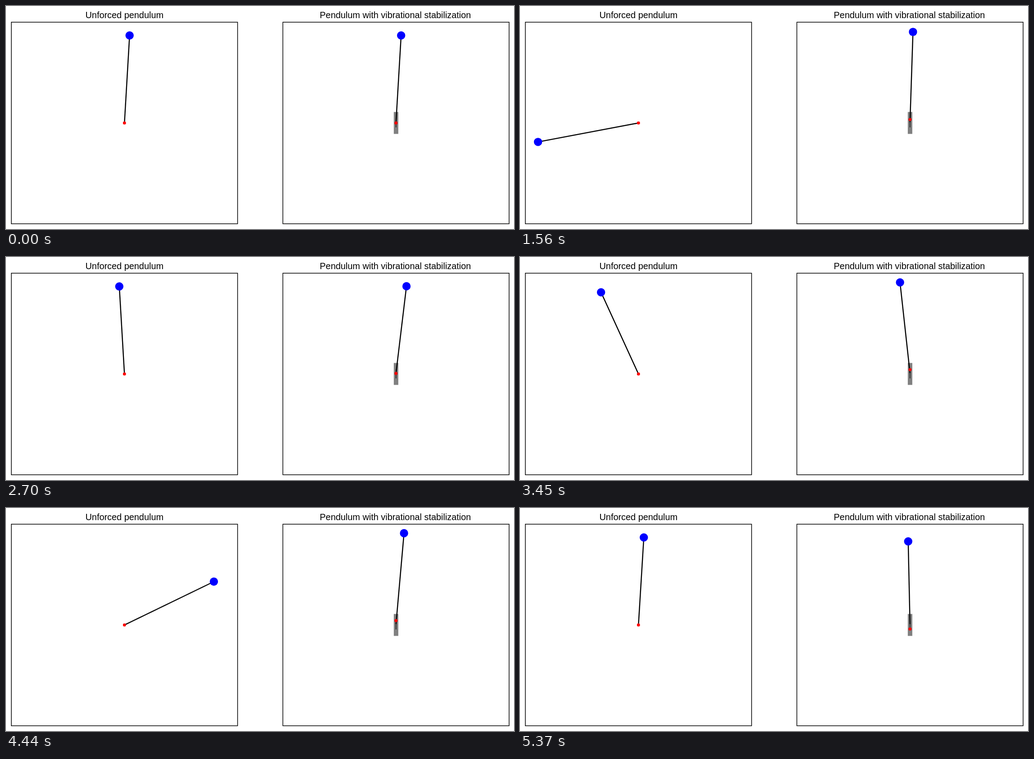
These frames come from a looping animation (1129 px wide and 496 px high, 5400 ms). An HTML page:

```html
<!DOCTYPE html>
<html lang="en">
<head>
<meta charset="utf-8">
<title>Pendulum stabilization</title>
<style>
  html, body { margin: 0; width: 100%; height: 100%; overflow: hidden; background: #fff; }
  svg { display: block; }
  text { font: 19.9px "Liberation Sans", Arial, sans-serif; text-anchor: middle; }
  .frame { fill: none; stroke: #000; stroke-width: 1.5; }
  .rod { stroke: #000; stroke-width: 2.4; }
  .bob { fill: #00f; }
  .pivot { fill: #f00; }
</style>
</head>
<body>
<svg width="1129" height="496" viewBox="0 0 1129 496">
  <g id="free" transform="translate(263.25 260.2)">
    <text y="-233.2">Unforced pendulum</text>
    <rect class="frame" x="-251.4" y="-224.2" width="502.8" height="448.4"/>
    <line class="rod"/>
    <circle class="bob" r="9.2"/>
    <circle class="pivot" r="3.4"/>
  </g>
  <g id="driven" transform="translate(866.75 260.2)">
    <text x="-1.4" y="-233.2">Pendulum with vibrational stabilization</text>
    <rect class="frame" x="-251.4" y="-224.2" width="502.8" height="448.4"/>
    <rect x="-4.9" y="-24.5" width="10" height="48.8" fill="#808080"/>
    <line y1="-9.8" y2="9.8" stroke="#000" stroke-width="1.2"/>
    <line class="rod" y1="-2"/>
    <circle class="bob" r="9.2"/>
    <circle class="pivot" r="3.4"/>
  </g>
</svg>
<script>
const FRAME_MS = 30, FRAMES = 180;
const LENGTH_X = 228.6, LENGTH_Y = 195;   // the axes scale x and y differently
const START_ANGLE = 0.05;                 // radians from upright
const NATURAL = 0.11175;                  // angular rates are per frame
const DRIVE = 4.5742, DRIVE_SIZE = 0.05;
const SLOW = 0.1247, SLOW_KICK = 1.88;

// Free fall from near upright, integrated once with leapfrog steps.
function swingAngles() {
  const substeps = 40, dt = 1 / substeps, angles = [];
  const accel = angle => NATURAL ** 2 * Math.sin(angle);
  let angle = START_ANGLE, speed = 0;
  for (let n = 0; n < FRAMES; n++) {
    angles.push(angle);
    for (let i = 0; i < substeps; i++) {
      speed += accel(angle) * dt / 2;
      angle += speed * dt;
      speed += accel(angle) * dt / 2;
    }
  }
  return angles;
}

// Slow sway about upright with a ripple at the drive frequency.
function drivenAngle(n) {
  const sway = Math.cos(SLOW * n) - SLOW_KICK * Math.sin(SLOW * n);
  return START_ANGLE * sway * (1 + DRIVE_SIZE * Math.sin(DRIVE * n));
}

function setAttributes(element, values) {
  for (const name in values) element.setAttribute(name, values[name]);
}

function makePendulum(id) {
  const part = name => document.querySelector(`#${id} .${name}`);
  const rod = part("rod"), bob = part("bob"), pivot = part("pivot");
  return (angle, pivotY) => {
    const x = LENGTH_X * Math.sin(angle);
    const y = pivotY - LENGTH_Y * Math.cos(angle);
    setAttributes(rod, { x2: x, y2: y });
    setAttributes(bob, { cx: x, cy: y });
    setAttributes(pivot, { cy: pivotY });
  };
}

const freeAngles = swingAngles();
const drawFree = makePendulum("free");
const drawDriven = makePendulum("driven");
const start = performance.now();

function draw(now) {
  const n = Math.floor(Math.max(0, now - start) / FRAME_MS) % FRAMES;
  drawFree(freeAngles[n], 0);
  drawDriven(drivenAngle(n), LENGTH_Y * DRIVE_SIZE * Math.sin(DRIVE * n));
  requestAnimationFrame(draw);
}
draw(start);
</script>
</body>
</html>
```
